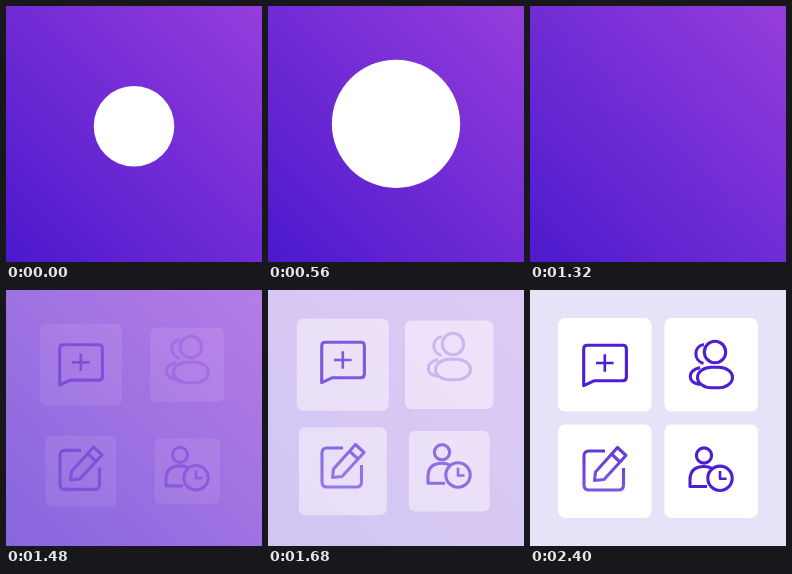
Animation of 256 by 256 pixels, one loop 3000 ms. Source, as an HTML page:

```html
<!DOCTYPE html>
<html lang="en">
<head>
<meta charset="utf-8">
<title>Splash to menu</title>
<style>
  html, body { margin: 0; width: 100%; height: 100%; overflow: hidden; }
  svg { display: block; width: 100vw; height: 100vh; }
  .icon { fill: none; stroke: #4d1fd0; stroke-width: 3.1; stroke-linejoin: round; }
  .thin { stroke-width: 2.6; }
</style>
</head>
<body>
<svg viewBox="0 0 256 256">
  <defs>
    <linearGradient id="sky" x1="0" y1="1" x2="1" y2="0">
      <stop stop-color="#4b19cd"/>
      <stop offset="1" stop-color="#963ddc"/>
    </linearGradient>
    <linearGradient id="ink" x1="0" y1="0" x2="0" y2="1">
      <stop stop-color="#6238d5"/>
      <stop offset="1" stop-color="#7a55dd"/>
    </linearGradient>
  </defs>
  <rect width="256" height="256" fill="url(#sky)"/>
  <circle id="mark" cx="128" fill="#fff"/>

  <g id="menu">
    <rect width="256" height="256" fill="#e8e2f9"/>
    <g id="cards" fill="#fff"></g>

    <g class="icon">
      <path d="M53.7 95.6V59q0-3.7 3.7-3.7H92.7q3.7 0 3.7 3.7V87q0 3.7-3.7 3.7H64.5Z"/>
      <path class="thin" d="M66 73H83.6M74.8 64.3V81.7"/>
    </g>

    <g class="icon">
      <circle cx="185" cy="62" r="10.7"/>
      <rect x="167.500" y="77.3" width="35" height="20.5" rx="14" ry="10.2"/>
      <path d="M174 54.5C163.500 56 163 70.500 173.500 73.500M170 77.500C157 81 157 92 170 94.500"/>
    </g>

    <g class="icon" style="stroke:url(#ink)">
      <path d="M75 161H59q-5 0-5 5V195q0 5 5 5H88.500q5 0 5-5V178"/>
      <path d="M64.500 190.500L65.500 182L87.500 157.500L96 165.500L74 189.500ZM81.500 164L90 172"/>
      <path class="thin" d="M76 190.300H85.500"/>
    </g>

    <g class="icon">
      <circle cx="174" cy="165.500" r="7.600"/>
      <path d="M177 196.500H160V190Q160 176.500 174 176.500Q179 176.500 182 178.500"/>
      <circle cx="190" cy="188.300" r="12.200"/>
      <path class="thin" d="M190 181V188.800H196.500"/>
    </g>
  </g>
</svg>
<script>
  const LOOP = 3000, SIZE = 93.5;
  const $ = id => document.getElementById(id);
  const mark = $("mark"), menu = $("menu");

  const clamp = v => Math.max(0, Math.min(1, v));
  const ramp = (t, from, to) => clamp((t - from) / (to - from));
  const sine = k => (1 - Math.cos(Math.PI * k)) / 2;

  // Centre, scale gained per second, and time of arrival
  const cards = [
    [74.8, 74.8, 0.54, 1708],
    [181.2, 74.8, 0.78, 1750],
    [74.8, 181.2, 0.91, 1746],
    [181.2, 181.2, 0.82, 1850]
  ].map(([x, y, rate, end]) => {
    const el = document.createElementNS("http://www.w3.org/2000/svg", "rect");
    $("cards").append(el);
    return { el, x, y, rate, end };
  });

  // Each icon hops up by lift and lands, while fading in from a faint start
  const hops = [
    { lift: 3, rise: 1400, land: 2300, faint: 0.43, fade: 1320, full: 2080 },
    { lift: 8, rise: 1200, land: 2300, faint: 0.22, fade: 1840, full: 2400 },
    { lift: 3, rise: 1400, land: 2100, faint: 0.43, fade: 1320, full: 2080 },
    { lift: 3.3, rise: 1400, land: 2100, faint: 0.22, fade: 1320, full: 2080 }
  ];
  const icons = [...document.querySelectorAll(".icon")].map((el, i) => ({ el, ...hops[i] }));

  function set(el, attrs) {
    for (const key in attrs) el.setAttribute(key, attrs[key]);
  }

  function draw(t) {
    set(mark, {
      r: 40.3 + 45 * sine(ramp(t, 0, 1080)),
      cy: 120.3 - 2.5 * ramp(t, 0, 560) + 1.5 * ramp(t, 560, 1080),
      opacity: 1 - ramp(t, 560, 1090)
    });

    set(menu, { opacity: ramp(t, 1320, 1740) });
    for (const { el, x, y, rate, end } of cards) {
      const s = 1 - rate * Math.max(0, end - t) / 1000;
      const w = SIZE * Math.max(0, s);
      set(el, { x: x - w / 2, y: y - w / 2, width: w, height: w, rx: 7 * w / SIZE });
    }

    for (const { el, lift, rise, land, faint, fade, full } of icons) {
      const up = sine(ramp(t, rise, 1680)) - sine(ramp(t, 1700, land));
      set(el, {
        transform: `translate(0 ${-lift * up})`,
        opacity: faint + (1 - faint) * ramp(t, fade, full)
      });
    }
  }

  const start = performance.now();
  function tick() {
    draw((performance.now() - start) % LOOP);
    requestAnimationFrame(tick);
  }
  tick();
</script>
</body>
</html>
```
